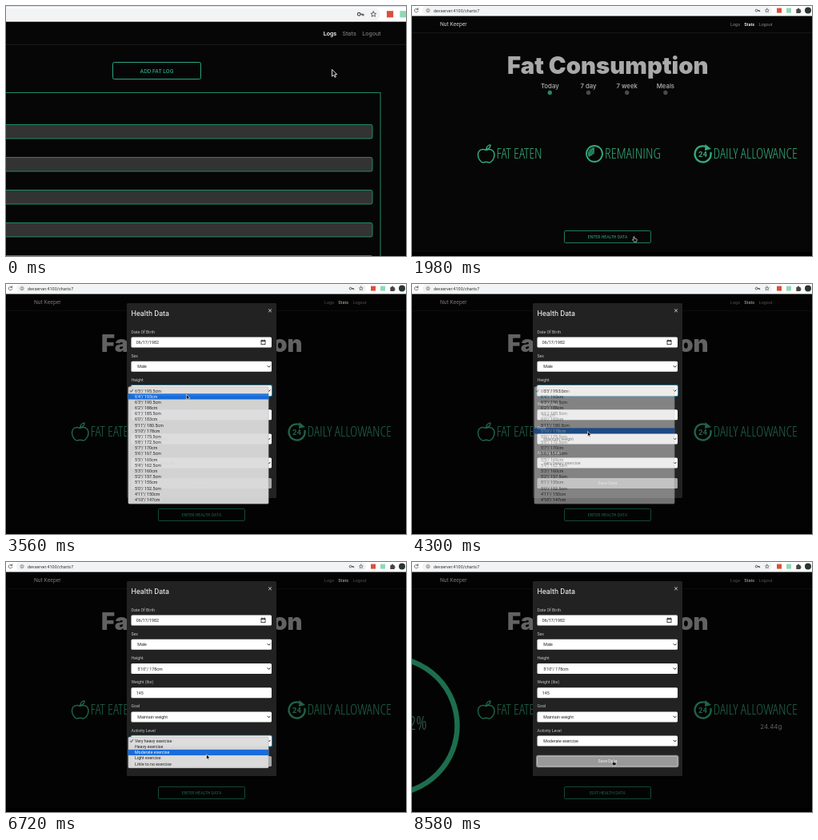
These frames come from a looping animation (500x313 px, 8600 ms). An HTML page:

```html
<!DOCTYPE html>
<html lang="en">
<head>
<meta charset="utf-8">
<title>Health data form</title>
<style>
html, body { margin: 0; width: 100%; height: 100%; overflow: hidden; background: #000; }
svg { display: block; width: 100vw; height: 100vh; font-family: Roboto, sans-serif; }
.wide { font-family: Inter, sans-serif; }
.thin { font-family: "Open Sans", sans-serif; font-weight: 300; font-stretch: 75%; }
</style>
</head>
<body>
<svg id="stage" viewBox="0 0 500 313"></svg>
<script>
const LOOP = 8600, ZOOM = 1.365, PAN_X = -146.5, PAN_Y = 2.6;
const GREEN = '#35a97c', INK = '#222', PALE = '#dcdcdc';

function el(parent, tag, attrs) {
  const node = document.createElementNS('http://www.w3.org/2000/svg', tag);
  for (const k in attrs) node.setAttribute(k, attrs[k]);
  parent.appendChild(node);
  return node;
}
const group = (p, attrs) => el(p, 'g', attrs);
const rect = (p, x, y, w, h, fill, more) => el(p, 'rect', { x, y, width: w, height: h, fill, ...more });
const circle = (p, cx, cy, r, fill, more) => el(p, 'circle', { cx, cy, r, fill, ...more });
const line = (p, d, stroke, width, more) =>
  el(p, 'path', { d, stroke, 'stroke-width': width, fill: 'none', 'stroke-linecap': 'round', 'stroke-linejoin': 'round', ...more });
function text(p, x, y, str, size, fill, more) {
  const node = el(p, 'text', { x, y, 'font-size': size, fill, ...more });
  node.textContent = str;
  return node;
}
const MID = { 'text-anchor': 'middle' };
const show = (node, on) => node.setAttribute('display', on ? 'inline' : 'none');
const clamp = v => Math.max(0, Math.min(1, v));
const span = (t, a, b) => clamp((t - a) / (b - a));
const ease = p => p * p * (3 - 2 * p);
const easeOut = p => 1 - Math.pow(1 - p, 4);

const scene = group(document.getElementById('stage'), {});
rect(scene, -10, 0, 520, 308, '#060606');
rect(scene, -10, 308, 520, 5, '#000');

// Navigation
const nav = group(scene, {});
line(nav, 'M-10 33.5H510', '#222', 0.6);
text(nav, 35, 25.3, 'Nut Keeper', 6.8, '#ccc');
const navLogs = text(nav, 404, 25, 'Logs', 5.5, '#fff', MID);
const navStats = text(nav, 421.7, 25, 'Stats', 5.5, '#888', MID);
text(nav, 442, 25, 'Logout', 5.5, '#888', MID);

// Log list, laid out in zoomed coordinates
const logs = group(scene, { transform: `scale(${1 / ZOOM}) translate(${-PAN_X} ${-PAN_Y})` });
rect(logs, 133.5, 70.5, 110, 21, 'none', { rx: 2, stroke: '#2aa583' });
text(logs, 188.5, 83.6, 'ADD FAT LOG', 7, '#2fc498', MID);
rect(logs, -60, 108.5, 528, 400, 'none', { stroke: '#1f8a6b' });
for (let i = 0; i < 5; i++)
  rect(logs, -60, 148.5 + i * 41, 518, 17.5, '#333', { rx: 2, stroke: '#1f8a6b' });

// Statistics page
const stats = group(scene, {});
text(stats, 244.8, 85.3, 'Fat Consumption', 29.3, '#a9a9a9', { ...MID, class: 'wide', 'font-weight': 900 });
['Today', '7 day', '7 week', 'Meals'].forEach((name, i) => {
  const x = 172.3 + i * 48.2;
  text(stats, x, 102.8, name, 7.8, '#b4b4b4', { ...MID, class: 'wide', 'font-weight': 500 });
  circle(stats, x, 108.5, 2.7, i ? '#4a4a4a' : '#238a63');
});
const heading = (x, str) => text(stats, x, 190.6, str, 18, GREEN, { class: 'thin' });
heading(105.5, 'FAT EATEN');
heading(241, 'REMAINING');
heading(376.5, 'DAILY ALLOWANCE');

line(stats, 'M92.5 180.5C88 178 82.5 180 82.5 186.5C82.5 191 86 196 89 196C90.5 196 91.5 195.2 92.8 195.2' +
  'C94 195.2 95 196 96.5 196C99.5 196 103 191 103 186.5C103 180 97 178 92.5 180.5Z' +
  'M92.8 179.5C93 176 95.5 174 98 174C98 177 96 179 92.8 179.5', GREEN, 1.5);
circle(stats, 228, 185, 10, 'none', { stroke: GREEN, 'stroke-width': 1.8 });
el(stats, 'path', { d: 'M228 185V177A8 8 0 0 0 221 189Z', fill: '#2a8764' });
for (let i = 0; i < 3; i++)
  line(stats, `M${221 + i * 2} ${183 + i * 2.2}L${225 + i * 1.2} ${178 + i * 2.4}`, '#0a1f17', 0.5);
line(stats, 'M369 177A10 10 0 1 0 373.5 184', GREEN, 2.4);
el(stats, 'path', { d: 'M366.5 173L374 179L366 181Z', fill: GREEN });
text(stats, 363.5, 188.6, '24', 9.5, GREEN, { ...MID, 'font-weight': 700 });

rect(stats, 190.5, 281.5, 108, 15, 'none', { rx: 1, stroke: '#238a65', 'stroke-width': 0.9 });
const dataButton = text(stats, 244.5, 291, 'ENTER HEALTH DATA', 5.15, '#2fb184', MID);

const result = group(stats, {});
const RING = 85.5, LENGTH = 2 * Math.PI * RING;
const ring = circle(result, -29, 205, RING, 'none',
  { stroke: '#30bd87', 'stroke-width': 6.5, transform: 'rotate(-90 -29 205)' });
text(result, 18.5, 209.5, '82%', 23, '#5fa58b', { 'text-anchor': 'end', class: 'thin' });
text(result, 448.8, 209, '24.44g', 8, '#a8a8a8', { ...MID, class: 'wide' });

// Modal form
const shade = rect(scene, -10, 12, 520, 301, '#000');
const modal = group(scene, {});
rect(modal, 151, 24, 187, 244, INK, { rx: 1.5 });
text(modal, 156.5, 39.6, 'Health Data', 9.1, '#fff');
line(modal, 'M328.4 31.7l3.2 3.2m0 -3.2l-3.2 3.2', '#ddd', 0.9);

const fieldY = i => 66.6 + i * 30.2;
const fields = ['Date Of Birth', 'Sex', 'Height', 'Weight (lbs)', 'Goal', 'Activity Level'].map((label, i) => {
  const y = fieldY(i), isSelect = i !== 0 && i !== 3;
  text(modal, 156.5, y - 5, label, 5.2, '#c4c4c4');
  const glow = rect(modal, 155.6, y - 0.9, 177.3, 14.8, '#2f86a8', { rx: 2 });
  rect(modal, 156.5, y, 175.5, 13, '#fff', { rx: 1.5 });
  const value = text(modal, isSelect ? 164.3 : 162.7, y + 8.5, '', 5.3, INK);
  if (isSelect) line(modal, `M327 ${y + 5.7}l1.6 1.7l1.6 -1.7`, '#222', 1);
  return { glow, value };
});
const [dob, sex, height, weight, goal, activity] = fields;
const mark = rect(modal, 162.3, 69.7, 7, 7, '#a9c8f5');
modal.insertBefore(mark, dob.value);
rect(modal, 319, 71, 5, 4.6, 'none', { stroke: '#222', 'stroke-width': 0.8 });
line(modal, 'M319 71.4h5m-4 -1.4v1m3 -1v1', '#222', 1);
sex.value.textContent = 'Male';
goal.value.textContent = 'Maintain weight';
const caret = rect(modal, 163, 160.5, 0.5, 6.5, '#222');

const saveGlow = rect(modal, 155, 241.7, 178.5, 15.6, '#777', { rx: 2.4 });
const save = rect(modal, 156.5, 243, 175.5, 13, '#a8a8a8', { rx: 1.5, 'stroke-width': 0.9 });
text(modal, 244.5, 251.4, 'Save Data', 5.4, '#f2f2f2', MID);

// Date picker
const picker = group(modal, {});
rect(picker, 156.5, 80, 82.5, 106, '#fff', { rx: 1, stroke: '#bbb', 'stroke-width': 0.4 });
text(picker, 161, 90.3, 'June 1982', 5, INK, { 'font-weight': 700 });
el(picker, 'path', { d: 'M184 87.6h3.2l-1.6 2z', fill: INK });
line(picker, 'M217.2 91.5v-5.5m-2.5 2.5l2.5 -2.5l2.5 2.5M229.3 86v5.5m-2.5 -2.5l2.5 2.5l2.5 -2.5', '#444', 0.7);
const dayX = c => 166 + c * 10.58, dayY = r => 113.5 + r * 10.52;
[...'SMTWTFS'].forEach((d, c) => text(picker, dayX(c), 104.4, d, 4.8, '#333', MID));
const cell = (c, r, fill) => rect(picker, dayX(c) - 5, dayY(r) - 5, 10, 10, fill);
cell(0, 2, '#1a73e8');
cell(4, 2, '#a9c9f5');
for (let i = 0; i < 42; i++) {
  const n = i - 1, inside = n >= 1 && n <= 30;
  const day = n < 1 ? n + 31 : inside ? n : n - 30;
  text(picker, dayX(i % 7), dayY(i / 7 | 0) + 1.7, day, 4.8,
    n === 13 ? '#fff' : inside ? '#222' : '#909090', MID);
}
text(picker, 224.5, 179.8, 'Today', 5, '#1a66d0', MID);

// Drop-down lists
const STEP = 7.18;
function menu(top, items) {
  const g = group(modal, {});
  rect(g, 152.8, top, 175.4, items.length * STEP + 3, PALE, { rx: 1.5, stroke: '#999', 'stroke-width': 0.4 });
  const bar = rect(g, 152.8, 0, 175.4, STEP, '#1a6fe0');
  const rows = items.map((s, i) => text(g, 161, top + 6.9 + i * STEP, s, 5.3, INK));
  const tick = line(g, `M155.5 ${top + 5.2}l1.1 1.4l2 -3.2`, INK, 0.8);
  return (alpha, pick) => {
    show(g, alpha > 0);
    g.setAttribute('opacity', alpha);
    bar.setAttribute('y', top + 1.5 + pick * STEP);
    rows.forEach((r, i) => r.setAttribute('fill', i === pick ? '#fff' : INK));
    tick.setAttribute('stroke', pick === 0 ? '#fff' : INK);
  };
}
const heights = Array.from({ length: 20 }, (_, i) => {
  const inch = 77 - i;
  const cm = inch < 59 ? 147 : Math.round(inch * 5.08) / 2;
  return `${inch / 12 | 0}'${inch % 12}"/ ${cm}cm`;
});
const levels = ['Very heavy', 'Heavy', 'Moderate', 'Light', 'Little to no'].map(s => s + ' exercise');
const heightMenu = menu(128.6, heights), levelMenu = menu(219, levels);

// Browser toolbar
const bar = group(scene, {});
rect(bar, -10, -6, 520, 18.5, '#fff');
rect(bar, -10, -6, 520, 5, '#dee1e6');
rect(bar, 13, 0.2, 437, 11, '#f1f3f4', { rx: 5.5 });
line(bar, 'M7.3 4.2A2.3 2.3 0 1 0 7.7 6.2M7.6 2.6v1.8h-1.8', '#555', 0.8);
circle(bar, 20, 5.6, 2.1, 'none', { stroke: '#555', 'stroke-width': 0.6 });
line(bar, 'M20 5.4v1.3M20 4.5v0', '#555', 0.6);
text(bar, 27, 7.5, 'devserver:4100/charts7', 5.4, '#333');
circle(bar, 430.6, 5.6, 1.4, 'none', { stroke: '#444', 'stroke-width': 0.8 });
line(bar, 'M432 5.6h2.7v1.2m-1.2 -1.2v1', '#444', 0.8);
const star = Array.from({ length: 10 }, (_, i) => {
  const a = i * Math.PI / 5, r = i % 2 ? 1.2 : 2.6;
  return `${(443.8 + r * Math.sin(a)).toFixed(2)} ${(5.7 - r * Math.cos(a)).toFixed(2)}`;
});
line(bar, `M${star.join('L')}Z`, '#444', 0.6);
rect(bar, 456, 2.6, 6, 6, '#d9503f');
rect(bar, 468, 2.6, 6, 6, '#8fd9b4');
line(bar, 'M481 4.4h4v4h-4z', '#444', 1.4, { fill: '#444' });
circle(bar, 483, 3.5, 1, '#444');
circle(bar, 485.6, 6.4, 1, '#444');
circle(bar, 495, 5.6, 4, '#2a3432');

// Pointer
const pointer = group(scene, {});
const outline = { fill: '#111', stroke: '#fff', 'stroke-width': 0.6, 'stroke-linejoin': 'round' };
const arrow = el(pointer, 'path', { d: 'M0 0V6.4L1.5 5L2.5 7.2L3.5 6.8L2.6 4.6H4.6Z', ...outline });
const hand = el(pointer, 'path', {
  d: 'M-.6 .5Q0 -.4 .6 .5V2.6L3.2 3.2Q3.9 3.5 3.7 4.4L3.1 6.8H.1L-2 4.2Q-1.8 3.2 -.6 4Z', ...outline });

// time, x, y of the pointer tip
const path = [
  [0, 405.9, 56.3], [540, 421, 22], [1250, 421, 22], [1960, 277.5, 288.5], [2140, 277.5, 288.5],
  [2400, 262, 250], [2559, 262, 250], [2560, 206, 132], [2680, 206, 132], [2800, 212, 136],
  [3060, 212, 136], [3400, 226, 134], [3480, 226, 134], [3900, 220, 178], [4120, 219.5, 184.5],
  [4420, 219.5, 184.5], [4600, 214, 163], [5879, 214, 163], [5880, 250, 234.5], [6200, 252, 246],
  [6560, 250.5, 240.8], [7420, 250.5, 240.8], [7620, 251.5, 248], [LOOP, 251.5, 248]
];
function tip(t) {
  const i = Math.max(1, path.findIndex(k => k[0] > t));
  const a = path[i - 1], b = path[i], p = ease(span(t, a[0], b[0]));
  return [a[1] + (b[1] - a[1]) * p, a[2] + (b[2] - a[2]) * p];
}

function draw(t) {
  const k = 1 - ease(span(t, 860, 1720));
  scene.setAttribute('transform', `translate(${PAN_X * k} ${PAN_Y * k}) scale(${1 + (ZOOM - 1) * k})`);
  const onStats = t >= 860;
  show(logs, !onStats);
  show(stats, onStats);
  navLogs.setAttribute('fill', onStats ? '#888' : '#fff');
  navStats.setAttribute('fill', onStats ? '#fff' : '#888');
  navLogs.setAttribute('font-weight', onStats ? 400 : 500);
  navStats.setAttribute('font-weight', onStats ? 500 : 400);

  const open = span(t, 2100, 2340), slide = 1 - Math.pow(1 - open, 3);
  shade.setAttribute('opacity', 0.42 * open);
  modal.setAttribute('opacity', open);
  modal.setAttribute('transform', `translate(0 ${-18 * (1 - slide)})`);
  show(modal, open > 0);

  const picking = t >= 2560 && t < 2680;
  show(picker, picking);
  show(mark, picking);
  dob.value.textContent = t < 2560 ? 'mm/dd/yyyy' : t < 2680 ? '06/13/1982' : '06/17/1982';
  height.value.textContent = heights[t < 4440 ? 0 : 7];
  const typed = t < 4620 ? 0 : t < 5080 ? 1 : t < 5400 ? 2 : 3;
  weight.value.textContent = typed ? '145'.slice(0, typed) : 'Weight';
  weight.value.setAttribute('fill', typed ? INK : '#777');
  activity.value.textContent = levels[t < 6880 ? 0 : 2];

  show(dob.glow, t >= 2560 && t < 3200);
  show(sex.glow, false);
  show(height.glow, t >= 3460 && t < 4560);
  show(weight.glow, t >= 4560 && t < 5880);
  show(goal.glow, false);
  show(activity.glow, t >= 5880 && t < 7640);
  show(caret, t >= 4560 && t < 5880);
  caret.setAttribute('x', 162.6 + typed * 3);

  const [x, y] = tip(t);
  const row = (top, n) => Math.max(0, Math.min(n - 1, Math.floor((y - top - 1.5) / STEP)));
  heightMenu(t < 3460 ? 0 : 0.95 * (1 - span(t, 4220, 4400)), t > 4100 ? 7 : row(128.6, 20));
  levelMenu(t < 5880 ? 0 : 0.97 * (1 - span(t, 6880, 7060)), row(219, 5));

  const pressed = t >= 7640;
  show(saveGlow, pressed);
  save.setAttribute('fill', pressed ? '#999' : '#a8a8a8');
  save.setAttribute('stroke', pressed ? '#c8c8c8' : 'none');

  const done = t >= 7980;
  show(result, done);
  dataButton.textContent = done ? 'EDIT HEALTH DATA' : 'ENTER HEALTH DATA';
  const arc = LENGTH * 0.82 * easeOut(span(t, 7980, 8580));
  ring.setAttribute('stroke-dasharray', `${arc} ${LENGTH}`);

  const pointing = (t > 480 && t < 1280) || (t > 1900 && t < 2160) || t >= 7520;
  show(pointer, t < 4620 || t >= 5880);
  show(hand, pointing);
  show(arrow, !pointing);
  pointer.setAttribute('transform', `translate(${x} ${y})`);
}

function tick(now) {
  draw(now % LOOP);
  requestAnimationFrame(tick);
}
draw(0);
requestAnimationFrame(tick);
</script>
</body>
</html>
```
